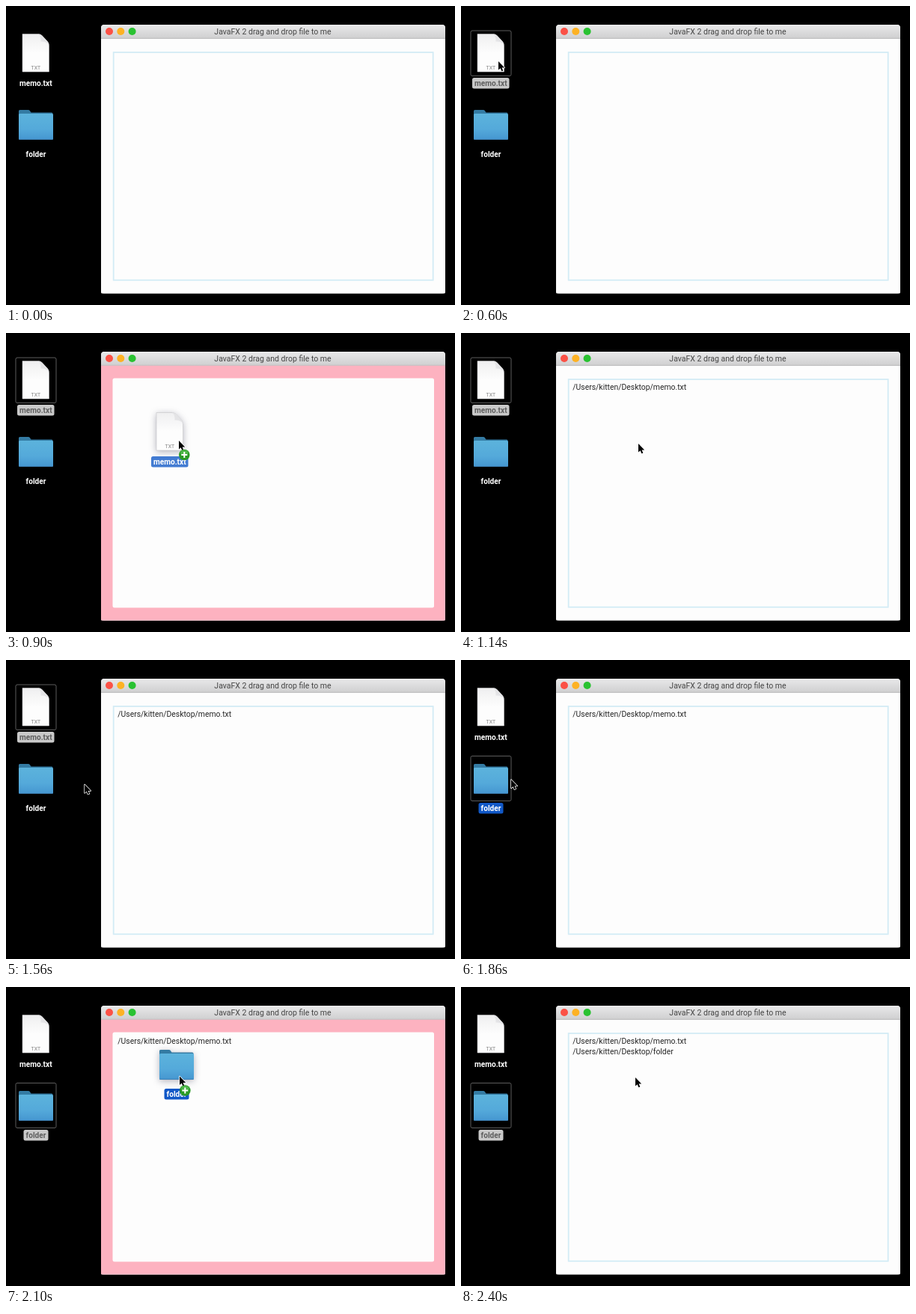
These frames come from a looping animation (600x400 px, 2460 ms). An HTML page:

```html
<!DOCTYPE html>
<html lang="en">
<head>
<meta charset="utf-8">
<title>Drag and drop</title>
<style>
  html, body { margin: 0; width: 100%; height: 100%; overflow: hidden; background: #000; }
  svg { display: block; width: 100%; height: 100%; }
  text { font-family: Roboto, "Liberation Sans", sans-serif; font-size: 10.4px; }
  .name { font-size: 10.1px; font-weight: 700; text-anchor: middle; fill: var(--ink, #fff); }
  .pill { fill: var(--pill, none); }
  .dim { --pill: #c9c9c9; --ink: #5e5e5e; }
  .blue { --pill: #1158c7; }
  .pale { --pill: #427bd2; }
  .glow { filter: drop-shadow(0 2px 5px rgba(70, 70, 95, .4)); }
  .frame { fill: #000; stroke: #5c5c5c; }
</style>
</head>
<body>
<svg viewBox="0 0 600 400">
  <defs>
    <linearGradient id="bar" x2="0" y2="1">
      <stop offset="0" stop-color="#e9e9ea"/>
      <stop offset="1" stop-color="#cfcfd0"/>
    </linearGradient>
    <linearGradient id="sky" x2="0" y2="1">
      <stop offset="0" stop-color="#5cb3dc"/>
      <stop offset=".6" stop-color="#54a9da"/>
      <stop offset="1" stop-color="#4596d0"/>
    </linearGradient>
    <linearGradient id="paper" x2="0" y2="1">
      <stop offset="0" stop-color="#efeff0"/>
      <stop offset=".5" stop-color="#fdfdfd"/>
    </linearGradient>
    <g id="fileIcon">
      <path d="M22 37.5H43Q46 37.5 48 39.5L55.5 47.5Q57.5 50 57.5 53V88H22Z" fill="url(#paper)" stroke="#c4c4c6" stroke-width=".6"/>
      <path d="M43 37.5Q47 40 46.5 47.5Q54 47 57.5 52Q57 49 55.5 47.5L48 39.5Q46 37.5 43 37.5Z" fill="#e4e4e6"/>
      <text x="39.8" y="84.5" text-anchor="middle" style="font-size:6.8px" fill="#828282">TXT</text>
    </g>
    <g id="folderIcon">
      <path d="M17 145V140.5Q17 139 18.5 139H30Q31.5 139 32.5 141L33.5 142.5H61Q62.5 142.5 62.5 144V148H17Z" fill="#347ba3"/>
      <rect x="17" y="144" width="46" height="35" rx="1.5" fill="url(#sky)"/>
      <path d="M17.5 178.4H62.5" stroke="#3b7cae" stroke-width=".8"/>
    </g>
    <g id="fileLabel">
      <rect class="pill" x="15" y="96" width="49.5" height="14.5" rx="2.5"/>
      <text class="name" x="39.8" y="106.8">memo.txt</text>
    </g>
    <g id="folderLabel">
      <rect class="pill" x="23.5" y="191" width="33" height="14.5" rx="2.5"/>
      <text class="name" x="40" y="202">folder</text>
    </g>
  </defs>

  <rect width="600" height="400"/>

  <rect id="fileFrame" class="frame" x="13" y="33" width="54" height="60.5" rx="2"/>
  <use href="#fileIcon"/>
  <use id="fileName" href="#fileLabel"/>
  <rect id="folderFrame" class="frame" x="13" y="128.5" width="54" height="60" rx="2"/>
  <use href="#folderIcon"/>
  <use id="folderName" href="#folderLabel"/>

  <rect x="127" y="25" width="460" height="359.5" rx="4" fill="url(#bar)"/>
  <path d="M127 25M127 43.5H587V383Q587 384.5 585.5 384.5H128.5Q127 384.5 127 383Z" fill="#fdfdfd"/>
  <path d="M127 43.5V30Q127 25 132 25H582Q587 25 587 30V43.5Z" fill="url(#bar)"/>
  <path d="M127 43.3H587" stroke="#b2b2b3" stroke-width=".8"/>
  <circle cx="138" cy="34" r="5" fill="#fb5146"/>
  <circle cx="153.3" cy="34" r="5" fill="#fdb224"/>
  <circle cx="168.6" cy="34" r="5" fill="#29c231"/>
  <text x="356.5" y="38" text-anchor="middle" style="font-size:10.5px" fill="#454545">JavaFX 2 drag and drop file to me</text>
  <rect x="143.7" y="62" width="427" height="304.7" fill="none" stroke="#d3ecf6" stroke-width="1.8"/>
  <g id="hover">
    <path d="M127 43.7H587V383Q587 384.5 585.5 384.5H128.5Q127 384.5 127 383Z" fill="#fdb2c0"/>
    <rect x="142.5" y="60.5" width="429.5" height="307" rx="2.5" fill="#fdfdfd"/>
  </g>
  <text id="line1" x="149.3" y="75.8" fill="#262626">/Users/kitten/Desktop/memo.txt</text>
  <text id="line2" x="149.3" y="90.3" fill="#262626">/Users/kitten/Desktop/folder</text>

  <g id="fileGhost">
    <use href="#fileIcon" class="shade"/>
    <use href="#fileLabel" class="pale"/>
  </g>
  <g id="folderGhost">
    <use href="#folderIcon" class="shade"/>
    <use href="#folderLabel" class="blue"/>
  </g>

  <g id="cursor">
    <path d="M0 0V11.6L2.6 9.2L4.4 13.2L6.3 12.4L4.6 8.5H8.2Z" stroke="#fff" stroke-width="1.5" stroke-linejoin="round" paint-order="stroke"/>
    <g id="badge">
      <circle cx="7.3" cy="19" r="7.3" fill="#2a9a26"/>
      <ellipse cx="7.3" cy="16" rx="5.4" ry="3.6" fill="#4db548"/>
      <path d="M3.3 19H11.3M7.3 15V23" stroke="#fff" stroke-width="2"/>
    </g>
  </g>
</svg>
<script>
  const LOOP = 2460, STEP = 60;
  const PICK1 = 600, DROP1 = 1140, PICK2 = 1740, LIFT2 = 1860, DROP2 = 2280;
  const $ = id => document.getElementById(id);
  const show = (id, on) => { $(id).style.display = on ? "" : "none"; };
  const place = (id, x, y) => $(id).setAttribute("transform", `translate(${x.toFixed(2)} ${y.toFixed(2)})`);

  const inOut = k => k * k * (3 - 2 * k);
  const out = k => 1 - (1 - k) * (1 - k);
  const into = k => k * k * .6 + k * .4;

  // time, x, y, easing used to get there
  const path = [
    [0, 190, 154, inOut],
    [480, 50, 74, inOut],
    [600, 50, 74, inOut],
    [900, 231, 144, inOut],
    [1080, 237, 148, out],
    [1260, 237, 148, out],
    [1740, 44, 175, inOut],
    [1860, 67, 160, into],
    [2100, 232, 119.5, out],
    [2340, 232.5, 120.5, out],
    [2400, 233, 121, out]
  ];

  function pointer(t) {
    const i = path.findIndex(p => p[0] > t);
    if (i < 0) return path[path.length - 1].slice(1, 3);
    const a = path[i - 1], b = path[i];
    const k = b[3]((t - a[0]) / (b[0] - a[0]));
    return [a[1] + (b[1] - a[1]) * k, a[2] + (b[2] - a[2]) * k];
  }

  function draw(t) {
    const [x, y] = pointer(t);
    const drag1 = t > PICK1 && t < DROP1;
    const drag2 = t > LIFT2 && t < DROP2;
    const over = (drag1 || drag2) && x > 127;
    const fileOn = t >= PICK1 && t < PICK2;
    const folderOn = t >= PICK2;

    show("fileFrame", fileOn);
    show("folderFrame", folderOn);
    $("fileName").setAttribute("class", fileOn ? "dim" : "");
    $("folderName").setAttribute("class", !folderOn ? "" : t <= LIFT2 ? "blue" : "dim");

    show("hover", over);
    show("line1", t >= DROP1);
    show("line2", t >= DROP2);

    show("fileGhost", drag1);
    show("folderGhost", drag2);
    place("fileGhost", x - 52, y - 75);
    place("folderGhost", x - 44, y - 174.5);
    for (const el of document.querySelectorAll(".shade")) el.classList.toggle("glow", over);

    show("cursor", t >= STEP);
    show("badge", over);
    place("cursor", x, y);
  }

  let start;
  function tick(now) {
    start ??= now;
    draw(Math.floor((now - start) % LOOP / STEP) * STEP);
    requestAnimationFrame(tick);
  }
  draw(0);
  requestAnimationFrame(tick);
</script>
</body>
</html>
```
